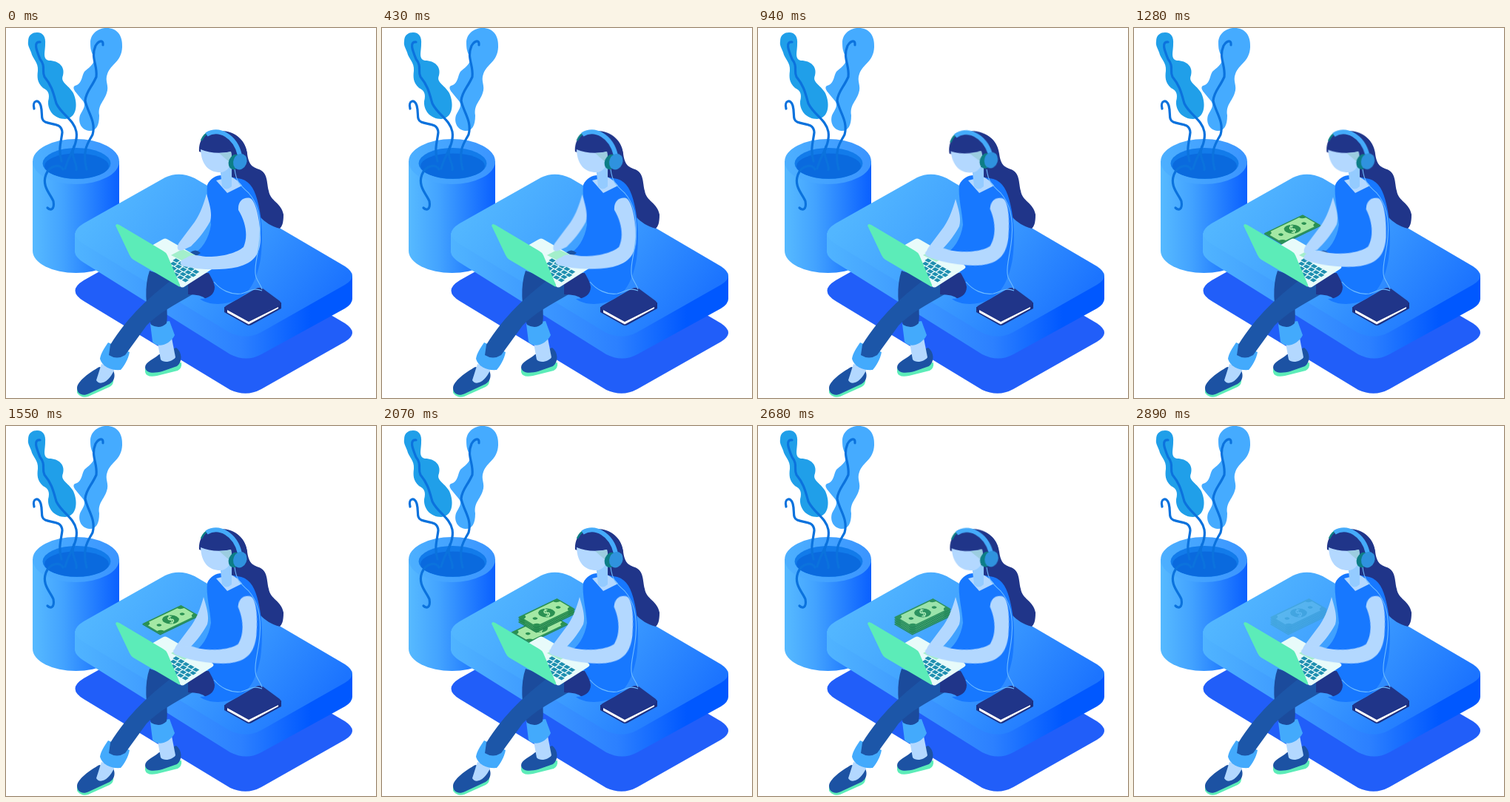
Write an HTML page that moves like this. It is 500 px wide and 500 px high and loops after 2920 ms.

```html
<!DOCTYPE html>
<html lang="en">
<head>
<meta charset="utf-8">
<title>Working with music</title>
<style>
  html, body { margin: 0; width: 100%; height: 100%; overflow: hidden; background: #fff; }
  svg { display: block; width: 100vw; height: 100vh; }
  .head, .arm, .reach, .cash, .bill, .lift { animation: 2920ms linear infinite; }

  .head { animation-name: nod; animation-timing-function: ease-in-out; transform-origin: 292px 195px; }
  @keyframes nod {
    0%, 13.7% { transform: rotate(0deg); }
    21.2% { transform: rotate(-5.5deg); }
    32.2% { transform: rotate(-5deg); }
    50%, 70.5% { transform: rotate(0deg); }
    85.6% { transform: rotate(-4.5deg); }
    100% { transform: rotate(0deg); }
  }

  .arm { animation-name: type; animation-timing-function: ease-in-out; transform-origin: 325px 242px; }
  @keyframes type {
    0%, 13.7% { transform: rotate(0deg); }
    17.6% { transform: rotate(5deg); }
    21.9% { transform: rotate(0deg); }
    32.2% { transform: rotate(8deg); }
    40% { transform: rotate(3deg); }
    49%, 100% { transform: rotate(8deg); }
  }

  .reach { animation-name: reach; animation-timing-function: ease-in-out; }
  @keyframes reach {
    0%, 13.7% { transform: translate(0, 0); }
    17.6% { transform: translate(-3px, 5px); }
    21.9% { transform: translate(0, 0); }
    32.2% { transform: translate(-4px, 7px); }
    40% { transform: translate(-1px, 3px); }
    49%, 100% { transform: translate(-4px, 7px); }
  }

  .cash { animation-name: cash; }
  @keyframes cash {
    0%, 40% { opacity: 0; }
    40.1%, 91% { opacity: 1; }
    100% { opacity: .07; }
  }

  /* Each note slides in at --t below the others, and resets while the pile is hidden. */
  .bill, .lift { animation-delay: calc(var(--t) - 2920ms); }
  .bill { animation-name: slide; }
  @keyframes slide {
    0% { transform: translate(-12px, 13px); opacity: 0; }
    1% { transform: translate(-10px, 12px); opacity: 1; }
    8%, 59% { transform: translate(0, 0); opacity: 1; }
    59.1%, 100% { transform: translate(0, 0); opacity: 0; }
  }
  .lift { animation-name: lift; }
  @keyframes lift {
    0% { transform: translateY(0); }
    1.2%, 59% { transform: translateY(-3px); }
    59.1%, 100% { transform: translateY(0); }
  }
</style>
</head>
<body>
<svg viewBox="0 0 500 500">
  <defs>
    <linearGradient id="pot"><stop stop-color="#57baff"/><stop offset=".35" stop-color="#43a3ff"/><stop offset="1" stop-color="#0a60ff"/></linearGradient>
    <linearGradient id="rim"><stop stop-color="#4db0ff"/><stop offset="1" stop-color="#3a94ff"/></linearGradient>
    <linearGradient id="top" x1=".05" y1=".3" x2=".95" y2=".7"><stop stop-color="#52b6ff"/><stop offset=".5" stop-color="#3d9dff"/><stop offset="1" stop-color="#1c74ff"/></linearGradient>
    <linearGradient id="side"><stop stop-color="#50b4ff"/><stop offset=".6" stop-color="#2c80ff"/><stop offset=".85" stop-color="#0058ff"/><stop offset="1" stop-color="#0058ff"/></linearGradient>
    <path id="slab" d="M215 202Q234 193 255 203L458 322Q478 335 458 347L345 411Q325 422 303 412L105 292Q82 278 105 264Z"/>
    <g id="note">
      <path d="M184.5 267L208.5 281L260.5 256V257.5L208.5 282.5L184.5 268.5Z" fill="#23854e"/>
      <g transform="matrix(.52 -.25 .48 .28 184.5 267)">
        <path d="M0 0H100V50H0Z" fill="#2a9152"/>
        <path d="M13 3.500H87Q88 11 97 12V38Q88 39 87 46.500H13Q12 39 3 38V12Q12 11 13 3.500Z" fill="#a4e8a4"/>
        <circle cx="50" cy="25" r="16" fill="#2a9152"/>
        <circle cx="20" cy="25" r="4.500" fill="#2a9152"/>
        <circle cx="80" cy="25" r="4.500" fill="#2a9152"/>
      </g>
      <text transform="matrix(.9 -.43 .5 .85 222.7 262)" text-anchor="middle" y="4.800" font-family="Lato, sans-serif" font-weight="700" font-size="14" fill="#b4f0b0">$</text>
    </g>
  </defs>

  <!-- plant -->
  <path d="M36 180V301A58.5 30 0 0 0 153 301V180Z" fill="url(#pot)"/>
  <ellipse cx="94.500" cy="180.500" rx="58.500" ry="30.500" fill="url(#rim)"/>
  <ellipse cx="95.500" cy="183" rx="46" ry="21" fill="#127bea"/>
  <ellipse cx="95.500" cy="186.500" rx="43.500" ry="17" fill="#0a6ade"/>
  <path d="M30 18C30 9 36 6 42 6C50 6 54 12 53 22C53 32 49 42 58 44C72 44 80 53 77 64C73 74 84 76 91 88C98 104 95 122 80 123C66 123 56 112 57 99C60 88 56 84 50 81C42 74 42 66 43 58C44 46 36 42 34 33C32 27 29 24 30 18Z" fill="#209fe9"/>
  <path d="M114 20C114 8 124 0 136 0C150 0 158 10 157 26C156 46 142 48 137 62C133 72 140 78 136 88C132 100 124 104 126 118C126 132 122 139 113 139C102 138 97 128 100 118C105 108 110 104 101 95C96 88 88 82 93 78C104 76 102 62 107 58C114 52 121 47 119 39C115 33 114 28 114 20Z" fill="#45abff"/>
  <g fill="none" stroke="#0b72dd" stroke-width="3.200" stroke-linecap="round">
    <path d="M46 19C36 18 42 32 46 42C54 52 48 58 52 66C62 78 64 88 68 102C76 118 92 124 95 140C98 158 84 172 80 190"/>
    <path d="M131 23C132 16 126 16 121 24C114 40 124 50 122 66C116 80 108 86 107 98C110 114 122 126 117 144C112 154 102 164 109 191"/>
    <path d="M38 109C35 98 44 95 47 105C50 116 46 124 53 127C62 131 75 128 76 141C75 152 70 164 75 180"/>
    <path d="M92 160C86 174 97 182 95 192"/>
    <path d="M77 191C74 184 60 184 54 198C48 214 60 224 64 234C66 246 60 247 56 243"/>
  </g>

  <!-- platform -->
  <use href="#slab" y="77" fill="#215ef9"/>
  <path d="M93 277V303Q94 310 105 317L303 441Q325 452 345 441L458 379Q468 373 468 366V335L325 300Z" fill="url(#side)"/>
  <use href="#slab" fill="url(#top)"/>

  <!-- money -->
  <g class="cash">
    <g class="bill" style="--t:2035ms"><use href="#note"/></g>
    <g class="lift" style="--t:2025ms">
      <g class="bill" style="--t:1800ms"><use href="#note"/></g>
      <g class="lift" style="--t:1790ms">
        <g class="bill" style="--t:1565ms"><use href="#note"/></g>
        <g class="lift" style="--t:1555ms">
          <g class="bill" style="--t:1220ms"><use href="#note"/></g>
        </g>
      </g>
    </g>
  </g>

  <!-- notebook -->
  <path d="M295 377V384L325 401Q328 403 332 401L372 379V371Z" fill="#1b2f80"/>
  <path d="M299 381L328 397L368 377V379L328 400.500L299 384.500Z" fill="#fff"/>
  <path d="M298 375L338 352Q342 350 347 352L370 369Q373 372 369 375L332 394Q328 396 324 394L298 380Q294 377 298 375Z" fill="#203589"/>

  <!-- hair behind the body -->
  <path d="M292 142C312 140 324 154 326 170C328 186 334 188 342 191C354 196 352 208 355 220C357 234 372 236 375 252C375 264 373 268 370 271C358 268 350 262 344 256L325 222L303 206L300 180Z" fill="#203589"/>

  <!-- legs -->
  <path d="M188 460V465Q190 473 204 470L232 463Q238 460 237 452Z" fill="#5cecb8"/>
  <path d="M207 441C198 449 188 451 188 459C190 468 202 466 211 464L231 457C239 451 238 438 230 432Z" fill="#1c52a3"/>
  <path d="M205 426L209 448C214 454 226 450 229 445L223 414Z" fill="#b3d8ff"/>
  <path d="M195 400L198 424C206 434 222 427 228 415L221 396Z" fill="#43aafc"/>
  <path d="M194 328C187 348 188 376 196 401Q208 408 217 399C219 388 216 378 219 368L245 345Z" fill="#1b4b9c"/>
  <path d="M96 487V493Q102 501 111 498L140 485Q146 482 145 474Z" fill="#5cecb8"/>
  <path d="M126 458C112 466 97 477 96 486C96 495 104 498 112 494L140 481C147 477 148 469 145 463Z" fill="#1c52a3"/>
  <path d="M129 454L122 476C126 484 140 479 147 460Z" fill="#b3d8ff"/>
  <path d="M138 425C133 432 128 440 127 447C130 458 142 463 155 462C160 456 165 448 167 438Z" fill="#43aafc"/>
  <path d="M222 342C196 362 166 388 141 428L139 442Q150 449 161 442L190 402C205 386 228 374 252 360L281 352V330Z" fill="#1c56a8"/>
  <path d="M246 346C258 335 270 328 280 332L283 352Q280 366 270 366Q264 360 246 360Z" fill="#203589"/>

  <!-- body -->
  <path d="M272 212C276 203 284 199 291 199L318 204C331 208 337 220 341 238C347 262 347 290 344 312C339 340 330 358 312 367C294 376 272 374 262 366C274 366 282 360 282 350C281 341 274 332 271 326L252 306C264 300 274 286 277 266C276 248 270 228 272 212Z" fill="#1778ff"/>
  <path d="M284 206L299 223L319 213Q313 205 304 201Z" fill="#b3d8ff"/>
  <path d="M289 188L292 214Q298 221 305 214V188Z" fill="#94cbff"/>
  <path d="M248 304Q256 297 263 304L256 309Z" fill="#1b52a3"/>

  <!-- laptop -->
  <path d="M197 294L211 286Q215 283 219 286L278 320Q283 323 278 326L242 349Q238 352 235 349Z" fill="#e8fbfa"/>
  <path d="M223 307L238 299L256 307L241 316Z" fill="#a3efcb"/>
  <g transform="matrix(3.3 1.9 -2.1 1.4 230 311)" stroke="#1f8fb0" stroke-width="2" stroke-dasharray="1.600 .4">
    <path d="M0 1.200H10M.5 3.700H10M0 6.200H10M.5 8.700H10"/>
  </g>
  <path d="M150 265Q147 266 149 269L167 307Q169 311 172 313L233 349Q236 351 235 347L218 307Q216 303 212 301L153 266Z" fill="#5cecb8"/>

  <!-- arms -->
  <path class="reach" d="M271 224C275 238 279 250 276 261C268 276 258 287 250 295L239 300C231 303 230 296 234 290L255 262C263 250 267 238 271 224Z" fill="#b3d8ff"/>
  <path class="arm" d="M314 246C313 234 321 228 330 230C338 234 343 260 344 282C344 306 335 317 313 323C290 328 262 327 240 322C232 319 236 313 243 311C252 304 260 308 270 309C290 310 312 304 321 296C327 282 325 264 314 246Z" fill="#b3d8ff"/>

  <!-- headphone cord -->
  <g fill="none" stroke="#6fbcff" stroke-width="1.100">
    <path d="M309 191C311 208 317 213 328 223C341 238 345 258 343 282C342 302 334 324 338 337C341 344 344 347 346 353"/>
    <path d="M281 343C290 354 304 361 318 359C330 356 334 350 346 355"/>
  </g>

  <!-- head -->
  <g class="head">
    <path d="M261 167C260 148 272 138 290 139C310 139 324 152 326 170C327 186 318 194 306 190L292 176Z" fill="#203589"/>
    <path d="M263 164C274 169 290 170 304 167C307 180 303 192 292 195C275 196 264 186 263 164Z" fill="#b3d8ff"/>
    <path d="M288 169Q297 169 304 167Q306 174 303 182Q298 178 288 169Z" fill="#9ccde0"/>
    <path d="M264 152C267 145 271 142 276 140" fill="none" stroke="#0d7e86" stroke-width="2.500"/>
    <path d="M271 144C288 134 310 146 316 172" fill="none" stroke="#45abfa" stroke-width="6"/>
    <ellipse cx="309" cy="181" rx="8" ry="10.500" fill="#0d7e86" transform="rotate(22 309 181)"/>
    <ellipse cx="316.500" cy="180.500" rx="9" ry="11" fill="#2f92de" transform="rotate(22 316 180)"/>
  </g>
</svg>
</body>
</html>
```
